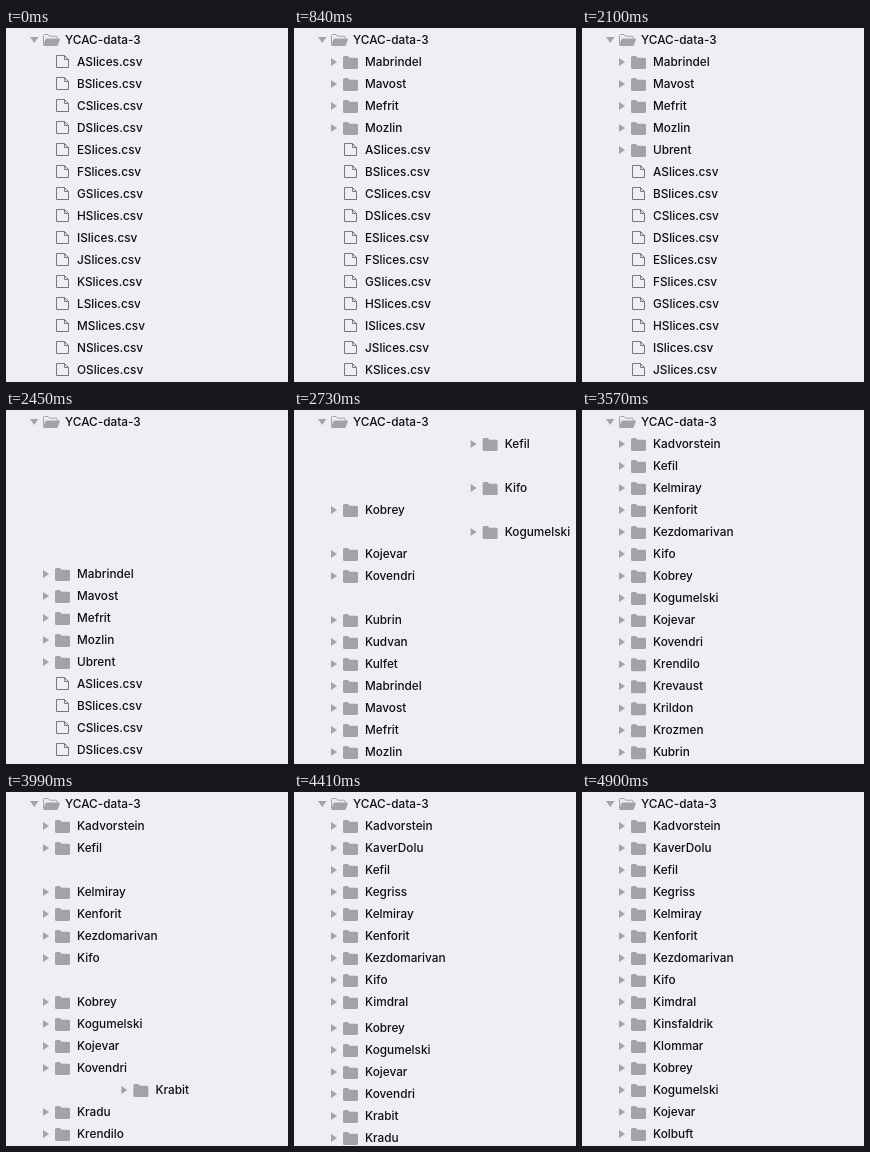
An HTML page with a canvas that plays this animation: 282x354 px, repeating every 5.11 s.

```html
<!DOCTYPE html>
<html lang="en">
<head>
<meta charset="utf-8">
<title>Sidebar file tree</title>
<style>
  html, body { margin: 0; width: 100%; height: 100%; overflow: hidden; background: #eeeff4; }
  canvas { display: block; width: 282px; height: 354px; }
</style>
</head>
<body>
<canvas id="tree"></canvas>
<script>
const WIDTH = 282, HEIGHT = 354;
const LOOP = 5110, TICK = 70;
const ROW = 22, OPEN_MS = 110, SLIDE_MS = 100, SLIDE_FROM = 245;
const PAPER = '#eeeff4', INK = '#101012', GRAY = '#a2a3a7', LINE = '#77787c';

const canvas = document.getElementById('tree');
const ctx = canvas.getContext('2d');
const ratio = window.devicePixelRatio || 1;
canvas.width = WIDTH * ratio;
canvas.height = HEIGHT * ratio;
ctx.scale(ratio, ratio);

// Folders in list order: name, time its gap opens, time it slides in.
const folders = [
  ['Kadvorstein', 2840, 2960],
  ['KaverDolu', 4120, 4240],
  ['Kefil', 2560, 2687],
  ['Kegriss', 3870, 3991],
  ['Kelmiray', 3215, 3325],
  ['Kenforit', 2610, 2755],
  ['Kezdomarivan', 2990, 3111],
  ['Kifo', 2560, 2687],
  ['Kimdral', 3870, 3991],
  ['Kinsfaldrik', 4650, 4797],
  ['Klommar', 4380, 4515],
  ['Kobrey', 2110, 2490],
  ['Kogumelski', 2560, 2687],
  ['Kojevar', 2160, 2490],
  ['Kolbuft', 4650, 4797],
  ['Kovendri', 2210, 2490],
  ['Krabit', 3760, 3922],
  ['Kradu', 3565, 3700],
  ['Krendilo', 2610, 2755],
  ['Krevaust', 2840, 2960],
  ['Krildon', 2840, 2960],
  ['Krozmen', 2990, 3111],
  ['Kubrin', 2260, 2490],
  ['Kudvan', 2310, 2490],
  ['Kulfet', 2360, 2490],
  ['Mabrindel', 60, 478],
  ['Mavost', 160, 478],
  ['Mefrit', 260, 478],
  ['Mozlin', 360, 478],
  ['Ubrent', 880, 1017]
];
const files = [...'ABCDEFGHIJKLMNO'].map(letter => letter + 'Slices.csv');

const clamp = v => Math.min(1, Math.max(0, v));
const smooth = v => v * v * (3 - 2 * v);

const solidFolder = new Path2D(
  'M0 1.5Q0 0 1.5 0H5L6.5 1.7H13.5Q15 1.7 15 3.2V11.5Q15 13 13.5 13H1.5Q0 13 0 11.5Z');
const folderBack = new Path2D('M.5 10V1.5Q.5.5 1.5.5H5L6.5 2.2H13Q14 2.2 14 3.2V5');
const folderFlap = new Path2D(
  'M3.4 4.5H16Q17.2 4.5 16.8 5.7L14.8 11Q14.4 12 13.4 12H1.2Q0 12 .4 10.8L2.3 5.4Q2.6 4.5 3.4 4.5Z');
const page = new Path2D('M.5.5H8.5L12.5 4.5V12.5H.5ZM8.5.5V4.5H12.5');
const arrowRight = new Path2D('M0 0L6 4L0 8Z');
const arrowDown = new Path2D('M0 0H8.5L4.25 6Z');

function icon(path, x, y, color, outlined) {
  ctx.save();
  ctx.translate(x, y);
  ctx.fillStyle = ctx.strokeStyle = color;
  if (outlined) ctx.stroke(path); else ctx.fill(path);
  ctx.restore();
}

function label(text, x, y) {
  ctx.fillStyle = INK;
  ctx.fillText(text, x, y + 4);
}

function drawFolder(name, x, y) {
  icon(arrowRight, x + 37, y - 4, GRAY);
  icon(solidFolder, x + 49, y - 6, GRAY);
  label(name, x + 71, y);
}

function drawFile(name, y) {
  icon(page, 50, y - 7, LINE, true);
  label(name, 71, y);
}

function draw(time) {
  ctx.fillStyle = PAPER;
  ctx.fillRect(0, 0, WIDTH, HEIGHT);
  ctx.font = '500 11.8px Inter, "Open Sans", sans-serif';
  ctx.lineWidth = 1;

  icon(arrowDown, 24, 9, GRAY);
  icon(folderBack, 37, 6, GRAY, true);
  icon(folderFlap, 37, 6, GRAY);
  label('YCAC-data-3', 59, 12);

  let y = 12 + ROW;
  for (const [name, openAt, slideAt] of folders) {
    if (time >= slideAt) {
      drawFolder(name, SLIDE_FROM * (1 - clamp((time - slideAt) / SLIDE_MS)), y);
    }
    y += ROW * smooth(clamp((time - openAt) / OPEN_MS));
  }
  y = Math.round(y);
  files.forEach((name, i) => drawFile(name, y + i * ROW));
}

const start = performance.now();
function frame() {
  const time = (performance.now() - start) % LOOP;
  draw(Math.floor(time / TICK) * TICK);
  requestAnimationFrame(frame);
}
frame();
</script>
</body>
</html>
```
